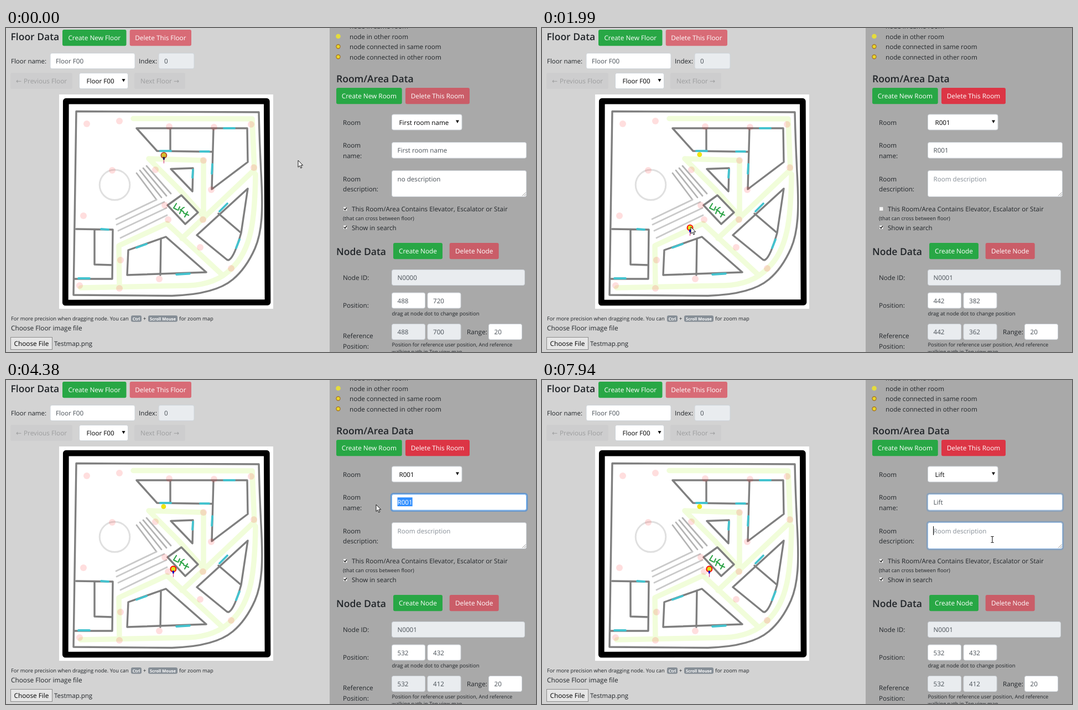
These frames come from a looping animation (958x585 px, 8000 ms). An HTML page:

```html
<!DOCTYPE html>
<html lang="en">
<head>
<meta charset="utf-8">
<title>Floor editor</title>
<style>
  html, body { margin: 0; width: 100%; height: 100%; overflow: hidden; background: #d3d3d3; }
  svg { display: block; }
  text {
    font-family: "Open Sans", "Noto Sans", sans-serif;
    text-rendering: geometricPrecision;
    font-variant-ligatures: none;
    white-space: pre;
  }
  .line { fill: none; stroke-linecap: round; stroke-linejoin: round; }
  .arrow { font-family: "DejaVu Sans", sans-serif; }
</style>
</head>
<body>
<svg id="stage" width="958" height="585" viewBox="0 0 958 585"></svg>
<script>
const INK = '#212529', FIELD = '#495057', MUTED = '#868e96';
const GREEN = '#28a745', RED = '#dc3545', LOCKED = '#e9ecef';
const IDLE = '#cdcdce', IDLE_TEXT = '#9c9d9e';
const LOOP = 8000;

// ---- building blocks ----
const text = (x, y, s, size = 11.65, fill = INK, more = '') =>
  `<text x="${x}" y="${y}" font-size="${size}" fill="${fill}" ${more}>${s}</text>`;
const box = (x, y, w, h, fill = '#fff', more = '') =>
  `<rect x="${x}" y="${y}" width="${w}" height="${h}" rx="3" fill="${fill}" ${more}/>`;
const framed = (x, y, w, h, fill = '#fff') =>
  box(x + .5, y + .5, w - 1, h - 1, fill, 'stroke="#ced4da"');
const line = (d, stroke, width, more = '') =>
  `<path class="line" d="${d}" stroke="${stroke}" stroke-width="${width}" ${more}/>`;
const dot = (x, y, r, fill, more = '') => `<circle cx="${x}" cy="${y}" r="${r}" fill="${fill}" ${more}/>`;
const heading = (x, y, s) => text(x, y, s, 17.5, INK, 'font-weight="600"');
const button = (x, y, w, label, fill, id = '', opacity = 1) =>
  box(x, y, w, 29.3, fill, `id="${id}" opacity="${opacity}"`) +
  text(x + w / 2, y + 19, label, 11.8, '#fff', 'text-anchor="middle"');
const field = (x, y, w, value, fill = '#fff', id = '') =>
  framed(x, y, w, 29, fill) + text(x + 10.5, y + 19, value, 11.65, FIELD, `id="${id}"`);
const select = (x, y, w, value, id = '') =>
  framed(x, y, w, 29) + text(x + 13.5, y + 19, value, 11.65, '#000', `id="${id}"`) +
  `<path d="M${x + w - 11.5} ${y + 11}h6l-3 5.5z" fill="#111"/>`;
const checkbox = (y, id) =>
  `<rect x="609.5" y="${y}" width="7.5" height="7.5" rx="1" fill="#f4f4f4" stroke="#999" stroke-width=".8"/>` +
  line(`M611.2 ${y + 3.8}l1.6 1.9 2.8-4`, '#222', 1.5, `id="${id}"`);
const badge = (x, w, label) => box(x, 519, w, 11.5, MUTED) +
  text(x + w / 2, 527.6, label, 7.45, '#fff', 'font-weight="700" text-anchor="middle"');
const glow = (x, y, w, h, id) => `<g id="${id}" fill="none">
  <rect x="${x - 1}" y="${y - 1}" width="${w + 2}" height="${h + 2}" rx="4" stroke="#007bff" stroke-opacity=".4" stroke-width="2.5"/>
  <rect x="${x + .5}" y="${y + .5}" width="${w - 1}" height="${h - 1}" rx="3" stroke="#80bdff"/></g>`;

// ---- floor plan ----
function floorPlan() {
  const spots = [[146, 173], [205, 168], [295, 178], [376, 179], [443, 174], [448, 252], [357, 239],
    [270, 256], [192, 257], [140, 339], [371, 292], [287, 320], [293, 346], [356, 346], [351, 396],
    [407, 434], [207, 419], [277, 453], [205, 470], [133, 465]];
  const ways = 'M230 163.5L445 164 449 256 318 380M451 264C450 345 444 400 408 434Q380 463 330 465L135 469' +
    'M205 468L204 393 291 353 389 444M357 346V239L258 236 312 290 357 340';
  const walls = 'M127 150.5L457 152Q458 200 461 260C465 330 463 368 450 398Q434 434 410 454Q378 481 300 483.5L122 482Z' +
    'M236 181L436 181 437 242 372 291 375 182M236 181L273 222 373 223.5M297 181V222' +
    'M298 254.5L338 253 337 295ZM437 290L425 370Q413 412 404 418Q402 420 399 418L345 374ZM384 335L425 370' +
    'M221 401L289 377 362 441 219 446ZM280 380L279 446' +
    'M127 363L193 364 192 453 123 453M160 364V427L192 428M317 302L347 333 324 354 292 320Z';
  const doors = 'M394 181H413M351 223H367M279 222H298M338 256L337 270M373 246L372 263M400 317L386 331' +
    'M422 382L416 397M254 390L236 396.5M308 445L332 443.5M172 363L185 364M131 452H151';
  return '<rect x="96" y="120" width="387" height="387" fill="#fff"/>' +
    line('M108.3 132.2L471.3 132.2 473 495.3 107.3 496Z', '#000', 10.7) +
    line(ways, '#f1fdda', 9.5) +
    line('M236 262L272 310M242 257L281 306M248 253L290 303M254 249L298 299', '#b4b4b4', 2.8) +
    line('M272 310L199 345M286 314L200 355M290 325L203 366M291 338L207 379', '#c9c9c9', 2.8) +
    dot(196.5, 283.3, 27.3, 'none', 'stroke="#e0e0e0" stroke-width="3"') +
    line(walls, '#7f7f7f', 3.4) + line(doors, '#43c3cf', 3.8) +
    line('M308 317L303 325 309 328M314 323L311 329M322 324Q318 324 314 335M315 328L321 332M328 332L323 341M321 334L330 338', '#2fa549', 2.2) +
    spots.map(([x, y]) => dot(x, y, 6, '#f00', 'opacity=".13"')).join('');
}

function leftPanel() {
  return heading(8.5, 22, 'Floor Data') +
    button(102, 3, 115.5, 'Create New Floor', GREEN) +
    button(223.7, 3, 111.3, 'Delete This Floor', RED, '', .65) +
    text(9, 64, 'Floor name:', 11.5) + field(79.5, 45, 154, 'Floor F00') +
    text(240, 64, 'Index:') + field(275.5, 45, 65, '0', LOCKED) +
    box(8, 81, 112, 29, IDLE) + text(18, 100, '←', 12, IDLE_TEXT, 'class="arrow"') +
    text(32, 100, 'Previous Floor', 11.8, IDLE_TEXT) +
    select(132, 81, 89, 'Floor F00') +
    box(232, 81, 92, 29, IDLE) + text(243, 100, 'Next Floor', 11.8, IDLE_TEXT) +
    text(303, 100, '→', 12, IDLE_TEXT, 'class="arrow"') +
    floorPlan() +
    text(9, 528, 'For more precision when dragging node. You can', 9.37) +
    badge(226, 19, 'Ctrl') + text(248, 528, '+', 9.4) + badge(257, 53, 'Scroll Mouse') +
    text(313, 528, 'for zoom map', 9.4) +
    text(9, 546, 'Choose Floor image file', 11.8) +
    '<rect x="8.5" y="558.5" width="75" height="22" fill="#e6e6e6" stroke="#8c8c8c"/>' +
    text(14.5, 573.5, 'Choose File', 11.8, '#000') + text(87, 573.5, 'Testmap.png', 11.5);
}

function rightPanel() {
  const legend = ['node in same room', 'node in other room', 'node connected in same room', 'node connected in other room'];
  return '<rect x="585" width="373" height="585" fill="#a9a9a9"/>' +
    legend.map((s, i) => text(621, 1 + i * 18.5, s)).join('') +
    dot(600.5, 15, 4.3, '#e5dc3c') +
    [33.5, 52].map(y => dot(600.5, y, 3.6, '#e8d52c', 'stroke="#a06a1c" stroke-width="1.1"')).join('') +
    heading(597, 98, 'Room/Area Data') +
    box(595.8, 106.8, 121, 31.6, 'none', 'id="ring" stroke="#28a745" stroke-opacity=".5" stroke-width="2.5"') +
    button(597, 108, 118.7, 'Create New Room', GREEN, 'create') +
    button(722, 108, 116, 'Delete This Room', RED, 'remove') +
    text(609, 175, 'Room') + select(697, 155.5, 127.5, '', 'picked') +
    text(609, 216, 'Room') + text(609, 234.5, 'name:') +
    framed(697, 206, 244, 29.5) + glow(697, 206, 244, 29.5, 'nameGlow') +
    '<rect id="mark" y="212" height="16" fill="#3390ff"/>' +
    text(707.5, 225, '<tspan id="plain"></tspan><tspan id="chosen" fill="#fff"></tspan>', 11.65, FIELD, 'id="name"') +
    '<rect id="caret" width="1" fill="#000"/>' +
    text(609, 276.5, 'Room') + text(609, 295, 'description:') +
    framed(697, 257, 244, 48) + glow(697, 257, 244, 48, 'noteGlow') +
    line('M933.5 303L939.5 297M937 303L939.5 300.5', '#777', .8) +
    text(707.5, 276.5, '', 11.65, FIELD, 'id="note"') + '<rect id="noteCaret" x="707" y="264" width="1" height="16"/>' +
    checkbox(322.8, 'lifts') + text(625, 331, 'This Room/Area Contains Elevator, Escalator or Stair') +
    text(609, 347, '(that can cross between floor)', 9.32) +
    checkbox(356, 'shown') + text(625, 364.5, 'Show in search', 11.55) +
    heading(597, 410, 'Node Data') +
    button(700, 388, 89, 'Create Node', GREEN) + button(801.7, 388, 89, 'Delete Node', RED, '', .65) +
    text(609, 455, 'Node ID:') + field(697, 436, 241, '', LOCKED, 'nodeId') +
    text(609, 505, 'Position:') + field(697, 477.5, 61, '', '#fff', 'posX') + field(761.5, 477.5, 61, '', '#fff', 'posY') +
    text(697.5, 518.5, 'drag at node dot to change position', 9.5) +
    text(609, 560, 'Reference') + text(609, 578.5, 'Position:') +
    field(697, 534, 61, '', LOCKED, 'refX') + field(761.5, 534, 61, '', LOCKED, 'refY') +
    text(833, 553, 'Range:') + field(872, 534, 61, '20') +
    text(697.5, 575, 'Position for reference user position, And reference', 9.27) +
    text(697.5, 588, 'walking path in Top view map', 9.27);
}

const nodeMark = dot(0, 0, 5, '#dfe01c', 'id="dial" stroke="#f00" stroke-width="1.9"') +
  '<path d="M0 3V14.5" stroke="#d0206a"/><path id="stem" d="M0 3V8" stroke="#0a0ac8" stroke-width="3"/>' +
  '<rect id="core" x="-2" y="-2.5" width="4" height="4"/>';

const stage = document.getElementById('stage');
stage.innerHTML = leftPanel() + rightPanel() +
  dot(284.8, 228.5, 4, '#f3e600', 'id="other" stroke="#d8d000" stroke-width=".6"') +
  `<g id="node">${nodeMark}</g>
  <path id="arrow" d="M0 0V12.3L2.9 9.6 4.8 14 6.8 13.1 4.9 8.9H8.7Z" fill="#fff" stroke="#000" stroke-width=".9"/>
  <path id="beam" d="M-2.5-5.5H-.7L0-5 .7-5.5H2.5M0-5V5M-2.5 5.5H-.7L0 5 .7 5.5H2.5" fill="none" stroke="#000"/>`;
const el = {};
stage.querySelectorAll('[id]').forEach(e => { if (e.id) el[e.id] = e; });

// ---- timing ----
// Each burst: first change, last change, number of changes.
const bursts = [[150, 910, 11], [990, 1760, 11], [1840, 2610, 11], [2680, 3460, 11], [3610, 4380, 11],
  [4460, 4620, 3], [5150, 5150, 1], [5380, 5380, 1], [5610, 5610, 1], [5780, 5780, 1], [6330, 6330, 1],
  [6860, 7630, 11], [7710, 7940, 4]];
const ticks = bursts.flatMap(([a, b, n]) =>
  Array.from({ length: n }, (_, i) => Math.floor((a + (n > 1 ? (b - a) * i / (n - 1) : 0)) / 10) * 10));
const lastTick = t => ticks.reduce((best, k) => k <= t ? k : best, 0);

const CLICK = 450, GRAB = 1220, DROP = 2450, CHECK = 3680, FOCUS = 4070, LEAVE = 7860;
const pointerKeys = [[0, 528, 239], [80, 528, 239], [380, 660, 127], [530, 658, 128], [830, 270, 395], [990, 125, 488],
  [1140, 98, 507], [1300, 98, 507], [1760, 203, 432], [1990, 269.05, 359.2], [2220, 296, 343],
  [2450, 303.9, 339.8], [2610, 303.9, 339.8], [2990, 430, 254], [3220, 570, 296], [3300, 625, 328],
  [3450, 616, 326], [3680, 616, 326], [3990, 742, 221], [4070, 742, 221], [4380, 669, 225],
  [4530, 659, 225], [4620, 667, 225], [6860, 667, 225], [7160, 800, 268], [7320, 927, 300],
  [7630, 814, 288], [LOOP, 814, 288]];

function pointerAt(t) {
  const i = Math.max(1, pointerKeys.findIndex(k => k[0] > t));
  const [a, ax, ay] = pointerKeys[i - 1], [b, bx, by] = pointerKeys[i];
  const u = (t - a) / (b - a);
  return [ax + (bx - ax) * u, ay + (by - ay) * u];
}

function nodeAt(t) {
  if (t < CLICK) return [488, 720];
  if (t < GRAB) return [0, 0];
  const [x, y] = pointerAt(Math.min(t, DROP));
  return [Math.max(0, Math.round((x - 98) / .387)), Math.max(0, Math.round((507 - y) / .387))];
}

const clamp = v => Math.min(1, Math.max(0, v));
const show = (e, on) => e.setAttribute('visibility', on ? 'visible' : 'hidden');
const set = (e, attrs) => Object.entries(attrs).forEach(([k, v]) => e.setAttribute(k, v));
const place = (e, x, y) => e.setAttribute('transform', `translate(${x} ${y})`);
const inside = (x, y, top, bottom) => x > 697 && x < 930 && y > top && y < bottom;

function render(time) {
  const t = lastTick(time), created = t >= CLICK;
  const [px, py] = pointerAt(t), [nx, ny] = nodeAt(t);

  const beam = inside(px, py, 206, 235) || inside(px, py, 257, 305);
  show(el.arrow, !beam);
  show(el.beam, beam);
  place(beam ? el.beam : el.arrow, px, py);

  place(el.node, 96.5 + .387 * nx, 508.5 - .387 * ny);
  set(el.dial, created ? { fill: '#dfe01c', stroke: '#f00' } : { fill: '#d3c02c', stroke: '#b5472a' });
  show(el.core, created && t < GRAB);
  el.stem.setAttribute('stroke', created ? '#0a0ac8' : '#151550');
  show(el.other, created);
  el.nodeId.textContent = created ? 'N0001' : 'N0000';
  el.posX.textContent = el.refX.textContent = nx;
  el.posY.textContent = ny;
  el.refY.textContent = Math.max(0, ny - 20);

  show(el.ring, created && t < GRAB);
  el.create.setAttribute('fill', t >= 380 && t < GRAB ? '#239540' : GREEN);
  el.remove.setAttribute('opacity', created ? 1 : .65);
  show(el.lifts, !created || t >= CHECK);

  const typed = [5150, 5380, 5610, 5780].filter(k => k <= t).length;
  const value = typed ? 'Lift'.slice(0, typed) : created ? 'R001' : 'First room name';
  el.picked.textContent = t >= 6330 ? 'Lift' : created ? 'R001' : 'First room name';

  const selecting = t > FOCUS && !typed;
  const from = selecting ? Math.round(4 * clamp((Math.min(px, t > 4380 ? 0 : px) - 707.5) / 27.5)) : value.length;
  el.plain.textContent = value.slice(0, from);
  el.chosen.textContent = value.slice(from);
  const caretX = 707.5 + (from ? el.plain.getComputedTextLength() : 0);
  set(el.mark, { x: caretX, width: from < value.length ? el.chosen.getComputedTextLength() : 0 });
  set(el.caret, { x: caretX, y: 212.5, height: 15.5 });
  const blinkOff = t >= 6330 && t < 6860;
  show(el.caret, t >= FOCUS && t < LEAVE && from === value.length && !blinkOff);

  const noteFocus = clamp((t - LEAVE) / 150);
  el.nameGlow.setAttribute('opacity', clamp((t - FOCUS + 70) / 150) - noteFocus);
  el.noteGlow.setAttribute('opacity', noteFocus);
  el.note.textContent = created ? 'Room description' : 'no description';
  el.note.setAttribute('fill', created ? MUTED : FIELD);
  show(el.noteCaret, t >= LEAVE);
}

const start = performance.now();
function frame() {
  render((performance.now() - start) % LOOP);
  requestAnimationFrame(frame);
}
frame();
</script>
</body>
</html>
```
